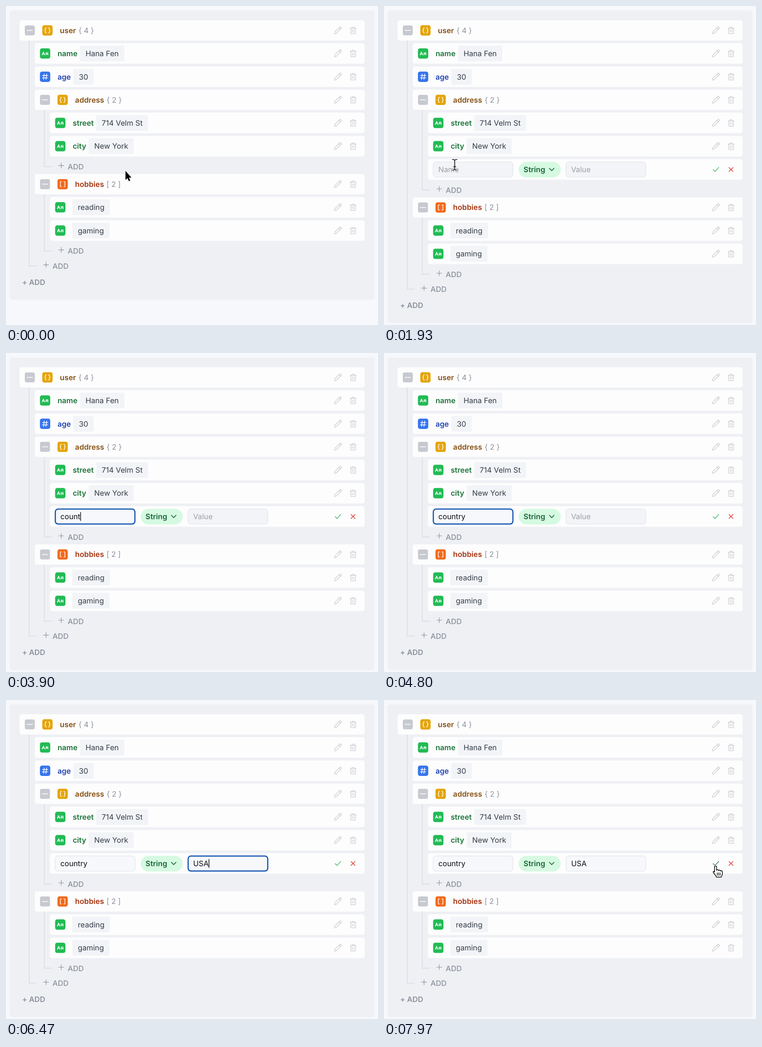
Recreate the animation shown at these times as an HTML page with a canvas. Size 808x693 px, loop 8 s.

```html
<!DOCTYPE html>
<html lang="en">
<head>
<meta charset="utf-8">
<title>Tree editor</title>
<style>
html, body { margin: 0; width: 100%; height: 100%; overflow: hidden; background: #f6f8fc; }
canvas { display: block; width: 808px; height: 693px; }
</style>
</head>
<body>
<canvas id="stage"></canvas>
<script>
const W = 808, H = 693, LOOP = 8000;
const canvas = document.getElementById('stage');
const ctx = canvas.getContext('2d');
const dpr = window.devicePixelRatio || 1;
canvas.width = W * dpr;
canvas.height = H * dpr;

const FILL = { str: '#22bb54', num: '#3574ee', obj: '#e5a50a', arr: '#f26a1c' };
const KEY = { str: '#1b7338', num: '#1e42b4', obj: '#854f10', arr: '#a5330f' };
const MUTED = '#8c919b', ICON = '#c9cbcf', LINE = '#dfe2e7', ROW = '#fdfdfe';

// Layout
const LEFT = 29.5, RIGHT = 779, TOP = 31, INDENT = 33;
const HEAD = 44, LEAF = 44.8, GAP = 5.75, ADD = 32.4, SIZE = 16.2;

// Times in ms
const OPEN = 1720, HIDE = 3450, SHOW = 6740;
const nameField = { hint: 'Name', word: 'country', focus: 2650, blur: 4900, start: 3480, step: 100 };
const valueField = { hint: 'Value', word: 'USA', focus: 4900, blur: 7800, start: 5500, step: 250 };

const leaf = (type, key, value) => ({ type, key, value });
const group = (type, key, ...items) => ({ type, key, items });
const tree = group('obj', 'user',
  leaf('str', 'name', 'Hana Fen'),
  leaf('num', 'age', '30'),
  group('obj', 'address', leaf('str', 'street', '714 Velm St'), leaf('str', 'city', 'New York')),
  group('arr', 'hobbies', leaf('str', '', 'reading'), leaf('str', '', 'gaming')));
tree.items[2].editable = true;

function box(x, y, w, h, r, fill, stroke, lw = 1) {
  ctx.beginPath();
  ctx.roundRect(x, y, w, h, r);
  if (fill) { ctx.fillStyle = fill; ctx.fill(); }
  if (stroke) { ctx.strokeStyle = stroke; ctx.lineWidth = lw; ctx.stroke(); }
}

function width(s, weight = 400) {
  ctx.font = `${weight} ${SIZE}px Inter, sans-serif`;
  return ctx.measureText(s).width;
}

// Draws text with y as the middle of its capitals and returns its right edge
function text(s, x, y, color, weight = 400) {
  const w = width(s, weight);
  ctx.fillStyle = color;
  ctx.fillText(s, x, y + SIZE * 0.36);
  return x + w;
}

function stroke(d, x, y, color, lw, fill) {
  const path = new Path2D(d);
  ctx.save();
  ctx.translate(x, y);
  ctx.strokeStyle = color;
  ctx.lineWidth = lw;
  ctx.stroke(path);
  if (fill) { ctx.fillStyle = fill; ctx.fill(path); }
  ctx.restore();
}

const GLYPH = {
  obj: 'M-2.4-5.5C-4.4-5.5-4.4-5-4.4-2.5Q-4.4 0-5.8 0Q-4.4 0-4.4 2.5C-4.4 5-4.4 5.5-2.4 5.5M2.4-5.5C4.4-5.5 4.4-5 4.4-2.5Q4.4 0 5.8 0Q4.4 0 4.4 2.5C4.4 5 4.4 5.5 2.4 5.5',
  arr: 'M-2.5-5.5H-5V5.5H-2.5M2.5-5.5H5V5.5H2.5',
  num: 'M-1.8-6L-3.4 6M3.4-6L1.8 6M-5.7-2.5H6M-6 2.5H5.7',
  str: 'M-6.4 3.2L-3.6-3.2L-.8 3.2M-5.4 1.3H-1.8M2 3.2V-.5Q2-1.7 3.2-1.7H4.8Q6-1.7 6-.5V3.2M2 1.1H6'
};
const PENCIL = 'M-6.6 3L3.6-7.1A2.1 2.1 0 0 1 6.8-4L-3.4 6.2L-7.6 7.4ZM2.3-5.8L5.4-2.7';
const TRASH = 'M-6.6-4.5H6.6M-2.8-4.5V-7H2.8V-4.5M-5.3-4.5L-5 7H5L5.3-4.5M-1.7-1.3V3.8M1.7-1.3V3.8';
const ARROW = 'M0 0V20L4.4 16L7.3 22.6L10.4 21.2L7.6 14.8H13Z';
const HAND = 'M-2 2C-2-.6 2.4-.6 2.4 2V9.5C2.8 7.5 6.4 7.6 6.6 10C7.4 8.3 10.6 8.8 10.8 11C11.8 9.8 15 10.4 15 13V17C15 20.3 12.8 21.2 12.8 24.3H1.8C1.6 21.5-1.5 19-4.3 14.5C-5.8 12-3.5 10.6-2 13.2Z';
const CREASES = 'M3.8 15V20.5M7 15V20.5M10.2 15V20.5';
const BEAM = 'M-5-11.5H-2L0-9.5L2-11.5H5M0-9.5V9.5M-5 11.5H-2L0 9.5L2 11.5H5M-2.5 4H2.5';

function typeIcon(type, x, y) {
  box(x - 11.2, y - 11.2, 22.4, 22.4, 4.5, FILL[type]);
  stroke(GLYPH[type], x, y, '#fff', 1.4);
}

function rowCard(x, y, h) {
  box(x, y - h / 2, RIGHT - x, h, 5, ROW);
}

function rowActions(y) {
  stroke(PENCIL, 721, y, ICON, 1.25);
  stroke(TRASH, 754, y, ICON, 1.25);
}

function drawLeaf(node, x, y) {
  rowCard(x, y, LEAF);
  typeIcon(node.type, x + 22.4, y);
  const keyX = x + 49.4;
  const boxX = node.key ? text(node.key, keyX, y, KEY[node.type], 600) + 5.4 : keyX - 0.9;
  box(boxX, y - 17, width(node.value) + 24, 34, 1.5, '#f2f4f7');
  text(node.value, boxX + 12, y, '#353c48');
  rowActions(y);
}

function drawHead(node, x, y) {
  rowCard(x, y, HEAD);
  box(x + 11.4, y - 10.8, 21.6, 21.6, 4, '#c6c9cf');
  stroke('M-6 0H6', x + 22.2, y, '#fff', 1.5);
  typeIcon(node.type, x + 60.5, y);
  const end = text(node.key, x + 87.6, y, KEY[node.type], 600);
  const n = node.items.length;
  text(node.type === 'obj' ? `{ ${n} }` : `[ ${n} ]`, end + 5.6, y, MUTED);
  rowActions(y);
}

// Draws a node with its children from y down and returns the y below it
function drawNode(node, depth, y, t, hover) {
  const x = LEFT + depth * INDENT;
  if (!node.items) {
    drawLeaf(node, x, y + LEAF / 2);
    return y + LEAF + GAP;
  }
  drawHead(node, x, y + HEAD / 2);
  const top = y + HEAD + 1;
  y += HEAD + GAP;
  for (const item of node.items) y = drawNode(item, depth + 1, y, t, hover);
  if (node.editable && t >= OPEN) {
    drawForm(x + INDENT, y + LEAF / 2, t, hover);
    y += LEAF + GAP;
  }
  const mid = y + ADD / 2;
  stroke(`M0 ${top}V${mid}H15.5`, x + 20.8, 0, LINE, 2.4);
  stroke('M-5.5 0H5.5M0-5.5V5.5', x + 57.5, mid - 2.2, MUTED, 1.2);
  text('ADD', x + 71.5, mid + 0.3, MUTED, 500);
  return y + ADD;
}

function drawField(f, x, y, t) {
  const count = Math.max(0, Math.floor((t - f.start) / f.step) + 1);
  const str = f.word.slice(0, count);
  const focused = t >= f.focus && t < f.blur;
  const fill = str ? '#f7f8fb' : '#f3f4f7';
  if (focused) box(x + 0.8, y - 16, 172.9, 32.4, 6, fill, '#1353ae', 2.5);
  else box(x + 0.5, y - 16.3, 173.5, 33, 6, fill, '#dde0e5');
  const end = text(str || f.hint, x + 11.7, y, str ? '#0c0e12' : '#9b9fa7');
  const lastKey = count ? f.start + (str.length - 1) * f.step : f.focus;
  if (focused && Math.floor((t - lastKey) / 500) % 2 === 0) {
    ctx.fillStyle = '#000';
    ctx.fillRect(str ? end : x + 11.7, y - 9.5, 1.4, 19);
  }
}

function drawForm(x, y, t, hover) {
  rowCard(x, y, LEAF);
  drawField(nameField, x + 10.8, y, t);
  box(x + 197, y - 16.5, 91.5, 34, 17, '#d6f9e1');
  text('String', x + 207.6, y, '#176437', 600);
  stroke('M-5-2.5L0 2.5L5-2.5', x + 268.8, y, '#176437', 1.5);
  drawField(valueField, x + 299.3, y, t);
  stroke('M-6 .5L-2 4.5L6-4.5', 721, y, hover ? '#2b6b48' : '#34b360', 1.4);
  stroke('M-4.4-4.4L4.4 4.4M4.4-4.4L-4.4 4.4', 753.8, y, '#e0392f', 1.4);
}

// Eased move between two points over a span of time
function glide(t, start, end, from, to) {
  const u = Math.min(1, Math.max(0, (t - start) / (end - start)));
  const e = u * u * (3 - 2 * u);
  return { x: from.x + (to.x - from.x) * e, y: from.y + (to.y - from.y) * e };
}

const REST = { x: 259.5, y: 358 }, ADD_LINK = { x: 156, y: 345 };
const NEAR_SAVE = { x: 656, y: 349 }, SAVE = { x: 720, y: 360.5 };

function pointer(t) {
  const p = t < SHOW ? glide(t, 120, 850, REST, ADD_LINK)
    : t < 7070 ? glide(t, SHOW, 7070, ADD_LINK, NEAR_SAVE)
    : glide(t, 7070, 7420, NEAR_SAVE, SAVE);
  return { ...p, kind: pointerKind(t, p.x) };
}

function pointerKind(t, x) {
  if (t < OPEN) return t < 850 ? 'arrow' : 'hand';
  if (t >= HIDE && t < SHOW) return 'none';
  if (x < 281 || (x > 395 && x < 570)) return 'beam';
  return x < 384 || x > 707 ? 'hand' : 'arrow';
}

function drawPointer({ x, y, kind }) {
  if (kind === 'arrow') {
    stroke(ARROW, x, y, '#fff', 2.4, '#000');
  } else if (kind === 'hand') {
    stroke(HAND, x, y, '#fff', 3.2, '#fff');
    stroke(HAND, x, y, '#000', 1.5);
    stroke(CREASES, x, y, '#000', 1.3);
  } else if (kind === 'beam') {
    stroke(BEAM, x - 2.5, y, '#fff', 3.2);
    stroke(BEAM, x - 2.5, y, '#111', 1.7);
  }
}

function render(t) {
  const p = pointer(t);
  ctx.setTransform(dpr, 0, 0, dpr, 0, 0);
  ctx.lineCap = ctx.lineJoin = 'round';
  ctx.textRendering = 'geometricPrecision';
  ctx.fillStyle = '#f6f8fc';
  ctx.fillRect(0, 0, W, H);
  const extra = t >= OPEN ? LEAF + GAP : 0;
  box(7.7, 9.5, 793, 628.8 + extra, 6, '#eef0f4');
  const bottom = drawNode(tree, 0, TOP, t, p.kind === 'hand' && p.x > 707);
  text('+ ADD', 35, bottom + 19, MUTED, 600);
  drawPointer(p);
}

function frame() {
  render(performance.now() % LOOP);
  requestAnimationFrame(frame);
}
frame();
</script>
</body>
</html>
```
